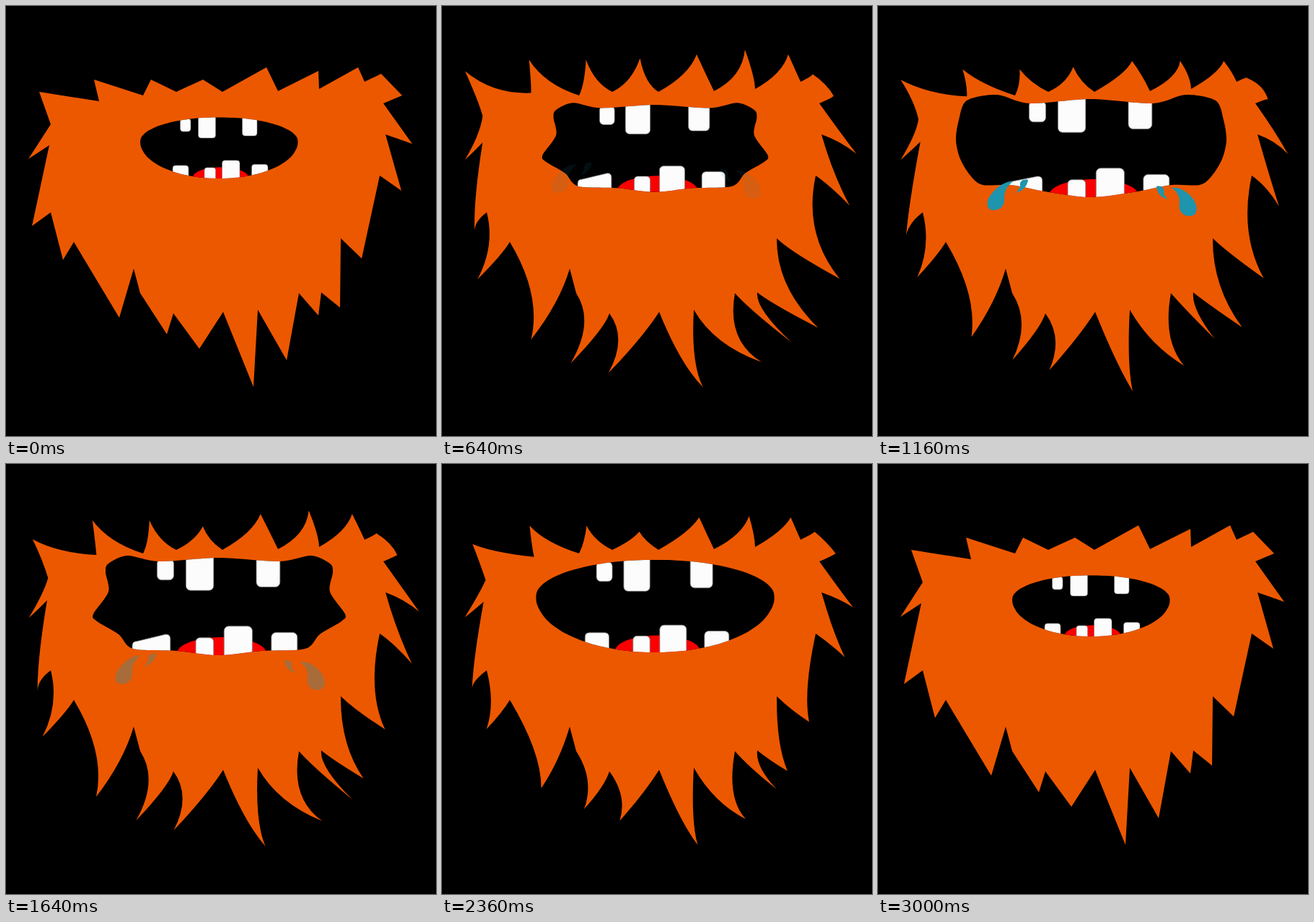
An HTML page that plays this animation: 596 by 596 pixels, repeating every 4800 ms.

```html
<!DOCTYPE html>
<html lang="en">
<head>
<meta charset="utf-8">
<title>Laughing beard</title>
<style>
  html, body { margin: 0; width: 100%; height: 100%; overflow: hidden; background: #000; }
  svg { display: block; width: 100vw; height: 100vh; }
  .tooth { fill: #fcfcfc; stroke: #777; stroke-width: .5; }
</style>
</head>
<body>
<svg viewBox="0 0 596 596">
  <defs><clipPath id="lips"><path id="lipsPath"/></clipPath></defs>
  <path id="beard" fill="#ec5800"/>
  <g id="mouth" clip-path="url(#lips)">
    <rect width="596" height="596"/>
    <g transform="translate(295 196) scale(1.6) translate(-295 -196)">
      <ellipse cx="297.5" cy="238" rx="39" ry="14.5" fill="#fb0000"/>
      <g class="tooth">
        <rect x="241.5" y="156" width="14.5" height="18" rx="4"/>
        <rect x="266.5" y="148" width="24" height="35" rx="4"/>
        <rect x="327.5" y="148" width="20.5" height="32" rx="4"/>
        <path id="looseTooth"/>
        <rect x="275" y="224" width="15.5" height="30" rx="3.5"/>
        <rect x="299.5" y="214" width="24.5" height="40" rx="4"/>
        <rect x="340.5" y="219.5" width="22.5" height="34" rx="4"/>
      </g>
    </g>
  </g>
  <g id="tears" fill="#1f94ad">
    <path d="M187 243C176 243 165 250 156 262C149 271 150 283 160 283C171 283 176 275 175 266C175 256 179 250 187 243Z"/>
    <path d="M208 241C200 239 196 244 197 249C196 254 193 256 192 259C199 257 207 250 208 241Z"/>
    <path d="M407 252C420 250 437 262 441 276C444 288 437 292 430 291C420 290 416 282 418 272C418 262 413 256 407 252Z"/>
    <path d="M386 250C394 248 398 254 396 260C398 264 400 266 402 268C392 265 387 260 386 250Z"/>
  </g>
</svg>
<script>
const LOOP = 4800, STEP = 40;
const OPEN = 580, SOB = 1160, LIFT = 1880, END = 3000;
const $ = id => document.getElementById(id);
const mix = (a, b, k) => a + (b - a) * k;
const mixPoint = (a, b, k) => [mix(a[0], b[0], k), mix(a[1], b[1], k)];
const mixShape = (a, b, k) => a.map((p, i) => mixPoint(p, b[i], k));
const parse = text => text.split(" ").map(p => p.split(",").map(Number));
const fix = (...points) => points.flat().map(v => v.toFixed(2)).join(" ");

// Linear keyframes [time, value]; blend mixes two values.
function track(keys, t, blend = mix) {
  let i = 0;
  while (i < keys.length - 2 && t >= keys[i + 1][0]) i++;
  const [[t0, a], [t1, b]] = keys.slice(i, i + 2);
  return blend(a, b, (t - t0) / (t1 - t0));
}

// Beard at rest, clockwise. Points are "x,y,looseness"; each tuft group
// flares by one offset, scaled by looseness. Slow groups settle steadily.
const tufts = [
  { flare: [-14, -30], slow: true, at: "62,164,.4 46,119,1 129,132,.4" },
  { flare: [-1, -29], at: "122,102,1 190,124,0 201,102,1 236,119,0" },
  { flare: [2, -31], slow: true, at: "273,102,1 300,119,0" },
  { flare: [-10, -24], at: "361,85,.8 377,118,0 433,90,1.3 434,115,0 488,85,.8 497,105,0" },
  { flare: [-6, 0], at: "520,94,1 549,124,1 523,135,0" },
  { flare: [15, 17], at: "563,191,.8 526,178,0 548,256,1.2 518,235,0" },
  { flare: [60, 28], slow: true, at: "493,350,1 464,322,0 463,418,1 437,397,0" },
  { flare: [54, 38], at: "433,429,1 406,398,0" },
  { flare: [56, 2], at: "389,491,1 349,421,0" },
  { flare: [20, 0], at: "343,528,1 301,424,0" },
  { flare: [-38, 34], at: "268,475,1 232,426,0 223,455,1.2 186,398,0 177,364,0 157,432,.9 94,327,0 79,352,.8 62,286,0" },
  { flare: [10, 9], at: "36,305,1 60,193,-.4 31,212,.1" },
];
const hairs = tufts.flatMap(({ flare, slow, at }) =>
  parse(at).map(([x, y, loose]) => ({ rest: [x, y], loose, flare, slow })));

function beardPath(t) {
  const quick = track([[0, 0], [OPEN, 1], [SOB, .7], [LIFT, 1], [END, 0]], t);
  const slow = track([[0, 0], [OPEN, 1], [END, 0]], t);
  const lean = track([[0, 0], [OPEN, 0], [SOB, 1], [LIFT, 0], [END, 0]], t);
  const points = hairs.map(h => {
    const amount = h.slow ? slow : quick;
    return [
      h.rest[0] + h.loose * (h.flare[0] * amount - 4 * lean),
      h.rest[1] + h.loose * (h.flare[1] * amount + 6 * lean),
    ];
  });
  // Handles stay on the resting edge, so moving tips bend their edges.
  return "M" + fix(points[0]) + hairs.map((h, i) => {
    const j = (i + 1) % hairs.length, next = hairs[j];
    const k = .5 + .2 * Math.sign(next.loose - h.loose);
    return "Q" + fix(mixPoint(h.rest, next.rest, k), points[j]);
  }).join("") + "Z";
}

// Left halves of the mouth, top to bottom.
const oval = Array.from({ length: 12 }, (_, i) => {
  const a = i * Math.PI / 11;
  return [295.5 - 175 * Math.sin(a), 183 - (i < 6 ? 54 : 82) * Math.cos(a)];
});
const wide = parse("295,129 210,135 165,123 123,131 112,158 108,186 114,212 128,235 145,248 184,248 237,258 295,265");
const jagged = parse("295,130 212,135 168,127 142,138 138,150 142,177 121,208 126,218 156,236 176,256 237,259 295,265");
const grin = mixShape(oval, wide, .75);
const mouthKeys = [[0, oval], [OPEN, jagged], [660, jagged], [SOB, wide], [1640, jagged],
  [LIFT, grin], [2250, oval], [END, oval]];

function mouthPath(half) {
  const mirrored = half.slice(1, -1).reverse().map(([x, y]) => [591 - x, y]);
  const p = [...half, ...mirrored], n = p.length, at = i => p[(i + n) % n];
  const handle = (i, k) => at(i).map((v, c) => v + k * (at(i + 1)[c] - at(i - 1)[c]));
  return "M" + fix(p[0]) + p.map((_, i) =>
    "C" + fix(handle(i, 1 / 7), handle(i + 1, -1 / 7), at(i + 1))).join("") + "Z";
}

function draw(t) {
  $("beard").setAttribute("d", beardPath(t));

  const size = track([[0, 1], [890, 1.6], [2250, 1.6], [END, 1]], t);
  $("mouth").setAttribute("transform", `translate(295 196) scale(${size / 1.6}) translate(-295 -196)`);
  $("lipsPath").setAttribute("d", mouthPath(track(mouthKeys, t, mixShape)));

  const pull = track([[0, 0], [OPEN, 11], [SOB, 8], [1640, 11], [LIFT, 4], [2250, 0], [END, 0]], t);
  const left = 231 - pull, top = 221 + pull * .55;
  $("looseTooth").setAttribute("d",
    `M${left} 254V${top + 4}Q${left} ${top} ${left + 4} ${top}L249 221Q253 221 253 225V254Z`);

  $("tears").setAttribute("opacity", track([[0, 0], [OPEN, 0], [SOB, 1], [LIFT, 0], [END, 0]], t));
  $("tears").setAttribute("transform", `translate(0 ${(t - SOB) * .046})`);
}

const start = performance.now();
function tick(now) {
  const t = Math.max(0, now - start) % LOOP;
  draw(Math.min(END, Math.floor(t / STEP) * STEP));
  requestAnimationFrame(tick);
}
draw(0);
requestAnimationFrame(tick);
</script>
</body>
</html>
```
